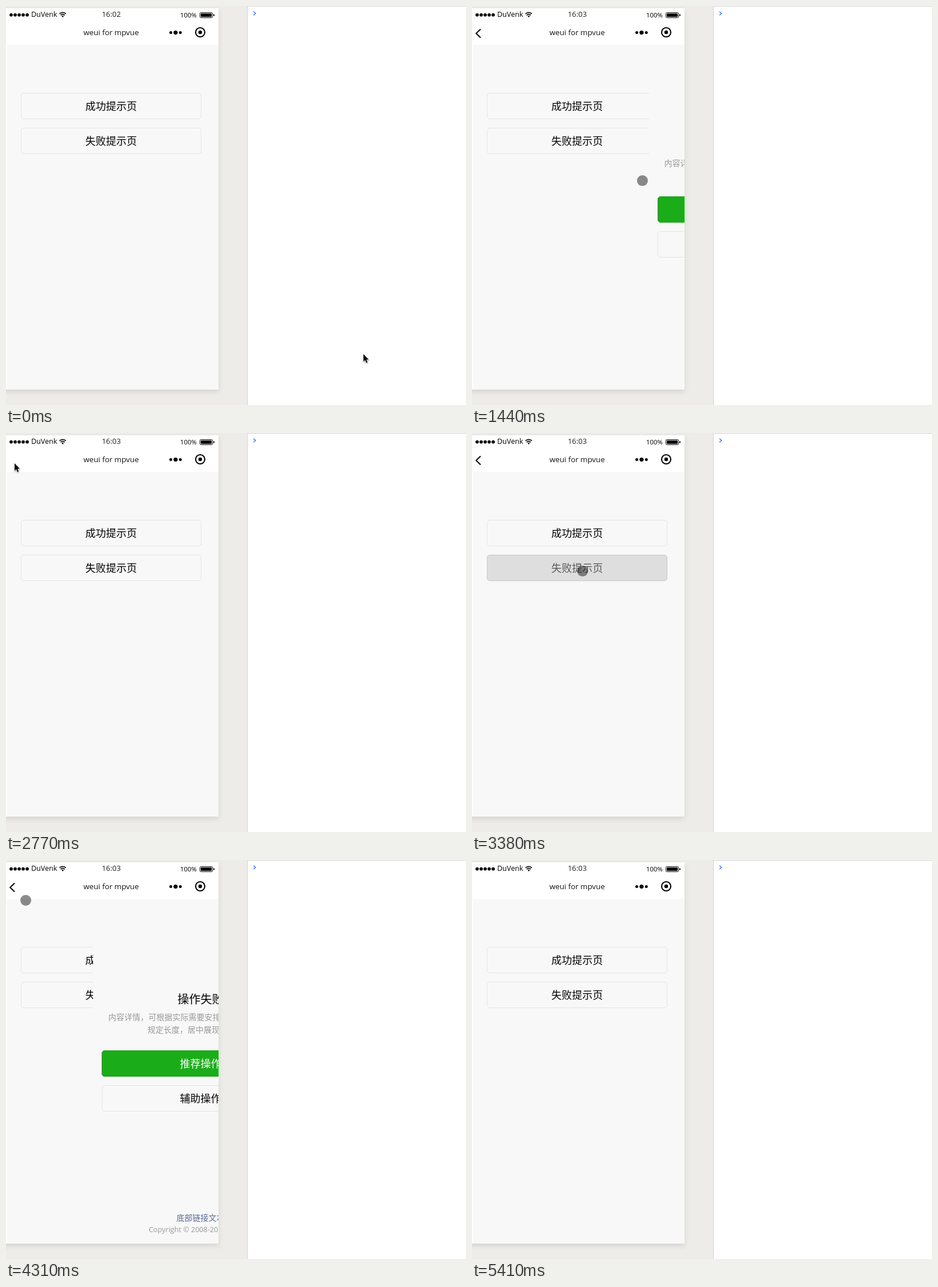
An HTML page for the animation above (5790 ms loop, 803 px wide and 698 px high).

```html
<!DOCTYPE html>
<html lang="zh">
<head>
<meta charset="utf-8">
<title>weui for mpvue</title>
<style>
  html, body { margin: 0; width: 100%; height: 100%; overflow: hidden; background: #edece8; }
  svg { display: block; width: 803px; height: 698px; }
  text { font-family: "Open Sans", "Noto Sans", sans-serif; }
  .cjk text { font-family: "Noto Sans CJK SC", "Noto Sans CJK", sans-serif; }
  .cjk .latin { font: 12.6px "Open Sans", "Noto Sans", sans-serif; }
  .mid { text-anchor: middle; }
  .big { font-size: 18px; }
  .small { font-size: 14px; }
  .plain { fill: #f8f8f8; stroke: #e4e4e4; }
  .pressed rect { fill: #dedede; stroke: #c9c9c9; }
  .pressed text { fill-opacity: .6; }
  .grey { fill: #999; }
  .link { fill: #576b95; }
  #phone { filter: drop-shadow(0 4px 4px rgba(0, 0, 0, .1)); }
  #arrow { filter: drop-shadow(.5px 1px 1px rgba(0, 0, 0, .4)); }
</style>
</head>
<body>
<svg viewBox="0 0 803 698">
  <defs>
    <clipPath id="view"><rect x="2" y="68" width="369" height="603"/></clipPath>
  </defs>
  <rect width="803" height="698" fill="#edece8"/>

  <rect id="phone" x="-30" y="4" width="401" height="667" fill="#fff"/>

  <!-- console -->
  <rect x="421" width="382" height="698" fill="#d4d4d4"/>
  <rect x="422" y="1" width="381" height="697" fill="#fff"/>
  <path d="M432 9.7l3.6 3.3-3.6 3.3" fill="none" stroke="#367cf1" stroke-width="1.5"/>

  <!-- status bar -->
  <g id="signal"></g>
  <text x="44" y="19" font-size="12.5">DuVenk</text>
  <path d="M93.3 13.6q5.7-4.6 11.4 0M95.4 16q3.6-2.8 7.2 0" fill="none" stroke="#000" stroke-width="1.7"/>
  <path d="M97 17.6q2-1.4 4 0l-2 2.4z"/>
  <text id="clock" class="mid" x="183.8" y="19" font-size="13" fill="#222"></text>
  <text x="304" y="20" font-size="11.4">100%</text>
  <rect x="338.5" y="11.5" width="22" height="9" rx="2" fill="#fff" stroke="#000"/>
  <rect x="340" y="13" width="19" height="6" rx=".8"/>
  <path d="M362 14q2 .5 2 2t-2 2z"/>

  <!-- title bar -->
  <path id="back" d="M15 40.5L7.2 48l7.8 7.5" fill="none" stroke="#000" stroke-width="2"/>
  <text class="mid" x="183.5" y="51" font-size="13.3" fill="#111">weui for mpvue</text>
  <circle cx="287.7" cy="46.5" r="2.5"/>
  <circle cx="296" cy="46.5" r="3.6"/>
  <circle cx="304.3" cy="46.5" r="2.5"/>
  <circle cx="339" cy="46" r="8" fill="none" stroke="#000" stroke-width="2.1"/>
  <circle cx="339" cy="46" r="3.2"/>

  <g clip-path="url(#view)" class="cjk mid">
    <rect y="68" width="371" height="603" fill="#f8f8f8"/>
    <g id="success" class="big">
      <rect class="plain" x="26.5" y="152.5" width="314" height="45" rx="4.5"/>
      <text x="183.5" y="182">成功提示页</text>
    </g>
    <g id="failure" class="big">
      <rect class="plain" x="26.5" y="213.5" width="314" height="45" rx="4.5"/>
      <text x="183.5" y="243">失败提示页</text>
    </g>

    <g id="result">
      <rect x="-4" y="68" width="375" height="603" fill="#f8f8f8"/>
      <g id="icon" fill="#fff">
        <circle id="disc" cx="183.5" cy="150.5" r="46.3"/>
        <path id="mark"/>
      </g>
      <text id="heading" x="183.5" y="251" font-size="20"></text>
      <g class="small grey">
        <text x="183.5" y="280">内容详情，可根据实际需要安排，如果换行则不超过</text>
        <text x="183.5" y="302">规定长度，居中展现 <tspan class="link">文字链接</tspan></text>
      </g>
      <g class="big">
        <rect x="11.5" y="333.5" width="344" height="45" rx="4.5" fill="#1aad19" stroke="#1aa619"/>
        <text x="183.5" y="363" fill="#fff">推荐操作</text>
        <rect class="plain" x="11.5" y="394.5" width="344" height="45" rx="4.5"/>
        <text x="183.5" y="424">辅助操作</text>
      </g>
      <text class="small link" x="183.5" y="631">底部链接文本</text>
      <text class="grey latin" x="183.5" y="651">Copyright © 2008-2018 weui.io</text>
    </g>
  </g>

  <path id="arrow" d="M0 0V13L2.9 10.3 5 15.2 7.2 14.3 5.1 9.5H9.1z" stroke="#fff" stroke-width="1.4" paint-order="stroke"/>
  <circle id="touch" r="9.5" fill-opacity=".45"/>
</svg>
<script>
// The screen refreshes at an even rate; all times below count refreshes.
const LOOP = 5790, TICKS = 75, PHASE = 28;
const PAGE_W = 375, OPEN_DELAY = 10.68, SLIDE = 3.72, ICON_DELAY = 2;

const VISITS = [
  { button: "success", press: 8, leave: 36, heading: "操作成功", color: "#09bb07",
    mark: "M160.5 152.5L163.5 149.5 175.5 159.5 205.5 134.5Q209.5 133.5 209 137.5L176.5 169.5z" },
  { button: "failure", press: 44, leave: 64, heading: "操作失败", color: "#f76260",
    mark: "M180 126h7l-1 32h-5zM179.7 169a3.8 3.8 0 0 1 7.6 0a3.8 3.8 0 0 1-7.6 0z" }
];

// Pointer glides: start, end and where each one stops
const HOME = { x: 624, y: 609 };
const GLIDES = [
  { from: 0, to: 6, x: 235.5, y: 183.5 },
  { from: 12, to: 17, x: 297.5, y: 305.5 },
  { from: 21, to: 26, x: 96.5, y: 56.5 },
  { from: 26, to: 34, x: 15, y: 53 },
  { from: 36, to: 41, x: 193, y: 241.5 },
  { from: 45, to: 55, x: 34.5, y: 70.5 },
  { from: 57, to: 60, x: 6, y: 51 },
  { from: 63, to: 70, x: 803, y: 753 }
];

const $ = id => document.getElementById(id);
const show = (id, on) => $(id).setAttribute("display", on ? "inline" : "none");
const move = (id, x, y) => $(id).setAttribute("transform", `translate(${x} ${y})`);
const clamp = v => Math.min(1, Math.max(0, v));
const easeOut = u => 1 - (1 - u) ** 2;

$("signal").innerHTML = [0, 1, 2, 3, 4]
  .map(i => `<circle cx="${9 + 7 * i}" cy="15.6" r="2.9"/>`).join("");

function drawPointer(tick) {
  let { x, y } = HOME;
  for (const g of GLIDES) {
    const k = clamp((tick - g.from) / (g.to - g.from));
    x += (g.x - x) * k;
    y += (g.y - y) * k;
  }
  const touching = x > 20 && x < 371 && y > 54;
  show("touch", touching);
  show("arrow", !touching);
  move(touching ? "touch" : "arrow", x, y);
}

function drawResult(visit, tick) {
  const age = visit ? tick - visit.press - OPEN_DELAY : -1;
  show("result", age >= 0);
  if (age < 0) return;
  move("result", Math.round(PAGE_W * (1 - easeOut(clamp(age / SLIDE)))), 0);
  show("icon", age >= ICON_DELAY);
  $("disc").setAttribute("fill", visit.color);
  $("mark").setAttribute("d", visit.mark);
  $("heading").textContent = visit.heading;
}

function draw(time) {
  const tick = Math.floor((time + PHASE) * TICKS / LOOP) % TICKS;
  const visit = VISITS.find(v => tick >= v.press && tick < v.leave);
  $("clock").textContent = tick < VISITS[0].press ? "16:02" : "16:03";
  show("back", visit);
  for (const v of VISITS) $(v.button).classList.toggle("pressed", tick === v.press);
  drawResult(visit, tick);
  drawPointer(tick);
}

function run() {
  draw(performance.now());
  requestAnimationFrame(run);
}
run();
</script>
</body>
</html>
```
